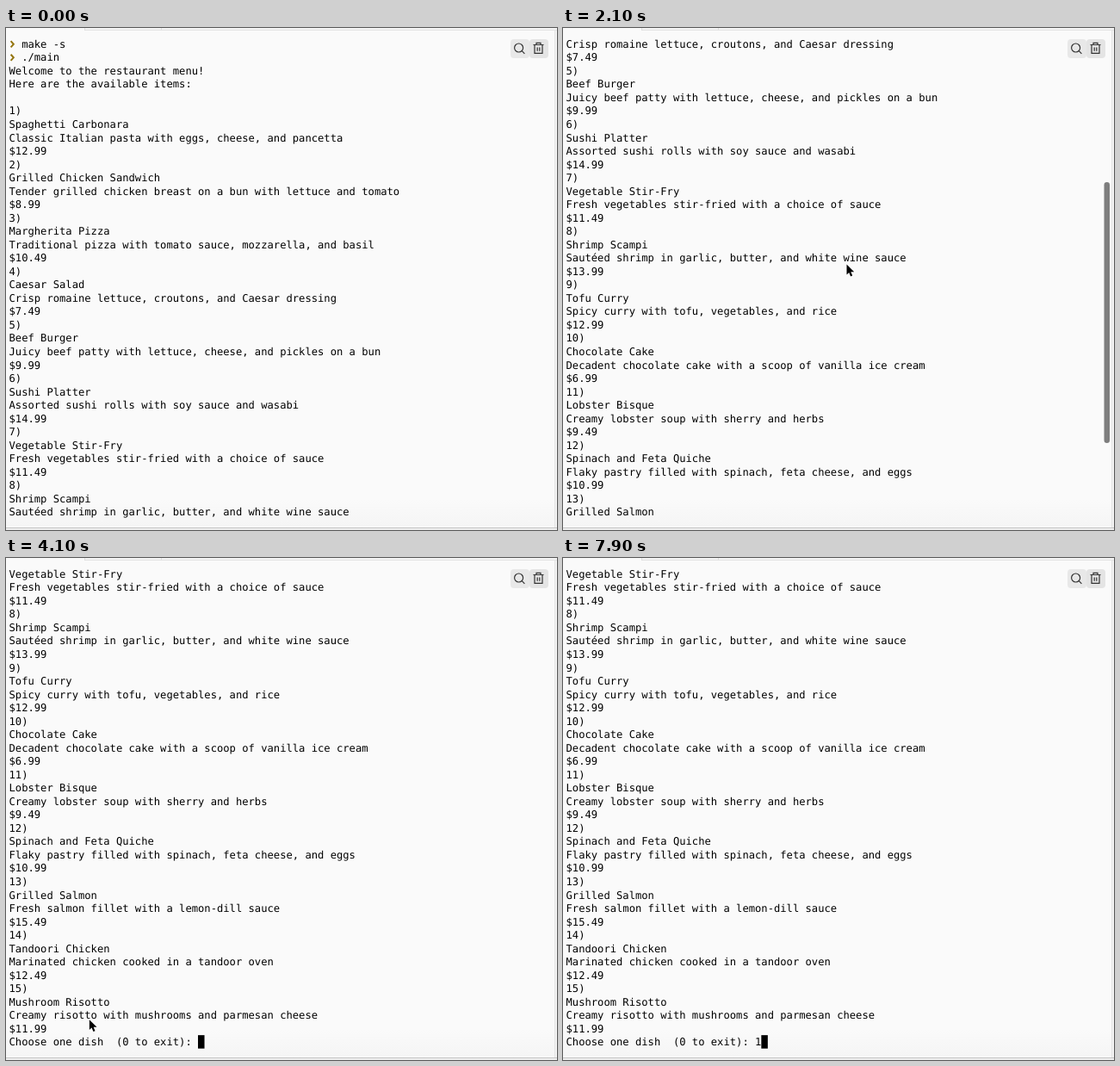
An HTML page with a canvas for the animation above (8000 ms loop, 640 by 583 pixels).

```html
<!DOCTYPE html>
<html lang="en">
<head>
<meta charset="utf-8">
<title>Restaurant menu</title>
<style>
html, body { margin: 0; width: 100%; height: 100%; overflow: hidden; background: #fafafa; }
canvas { display: block; width: 640px; height: 583px; }
</style>
</head>
<body>
<canvas id="stage" width="640" height="583"></canvas>
<script>
const ctx = document.getElementById('stage').getContext('2d');
const W = 640, H = 583, LOOP = 8000, STEP = 100;
const LEFT = 3.5, TOP = 10.8, CELL_W = 7.317, CELL_H = 15.53, ROWS = 36;
const PROMPT_ROWS = 2;

const menu = `Spaghetti Carbonara|Classic Italian pasta with eggs, cheese, and pancetta|12.99
Grilled Chicken Sandwich|Tender grilled chicken breast on a bun with lettuce and tomato|8.99
Margherita Pizza|Traditional pizza with tomato sauce, mozzarella, and basil|10.49
Caesar Salad|Crisp romaine lettuce, croutons, and Caesar dressing|7.49
Beef Burger|Juicy beef patty with lettuce, cheese, and pickles on a bun|9.99
Sushi Platter|Assorted sushi rolls with soy sauce and wasabi|14.99
Vegetable Stir-Fry|Fresh vegetables stir-fried with a choice of sauce|11.49
Shrimp Scampi|Sautéed shrimp in garlic, butter, and white wine sauce|13.99
Tofu Curry|Spicy curry with tofu, vegetables, and rice|12.99
Chocolate Cake|Decadent chocolate cake with a scoop of vanilla ice cream|6.99
Lobster Bisque|Creamy lobster soup with sherry and herbs|9.49
Spinach and Feta Quiche|Flaky pastry filled with spinach, feta cheese, and eggs|10.99
Grilled Salmon|Fresh salmon fillet with a lemon-dill sauce|15.49
Tandoori Chicken|Marinated chicken cooked in a tandoor oven|12.49
Mushroom Risotto|Creamy risotto with mushrooms and parmesan cheese|11.99`;

const lines = ['  make -s', '  ./main', 'Welcome to the restaurant menu!', 'Here are the available items:', ''];
menu.split('\n').forEach((row, i) => {
  const [name, text, price] = row.split('|');
  lines.push(`${i + 1})`, name, text, '$' + price);
});
const question = 'Choose one dish  (0 to exit): ';

// Keys are [time, value, ...]
const scrollKeys = [
  [1200, 0], [1300, 0.7], [1400, 2], [1500, 4.6], [1600, 7.6], [1700, 10.51],
  [1800, 13], [1900, 15.5], [2000, 17.7], [2100, 19.3], [2200, 20.5],
  [2400, 22], [2600, 22], [2700, 24.5], [2800, 28], [2900, 30]
];
const pointerKeys = [
  [400, 102, 281], [500, 205, 279], [600, 298, 276], [700, 329, 274],
  [3400, 329, 274], [3600, 308, 310], [3900, 185, 475], [4200, 52, 566],
  [4400, 32, 564], [4700, 70, 560], [5100, 138, 561], [5200, 139, 563],
  [5400, 139, 563], [5500, 132.5, 547.5], [5800, 75, 480], [6100, 22, 437],
  [6300, 11, 436], [6400, 6, 438], [6600, 50, 442], [6800, 110, 452], [7000, 138, 456]
];

function sample(keys, t) {
  if (t <= keys[0][0]) return keys[0].slice(1);
  for (let i = 1; i < keys.length; i++) {
    const a = keys[i - 1], b = keys[i];
    if (t <= b[0]) {
      const k = (t - a[0]) / (b[0] - a[0]);
      return a.slice(1).map((v, j) => v + (b[j + 1] - v) * k);
    }
  }
  return keys[keys.length - 1].slice(1);
}

function rect(x, y, w, h, color, r = 0) {
  ctx.fillStyle = color;
  ctx.beginPath();
  ctx.roundRect(x, y, w, h, r);
  ctx.fill();
}

function stroke(d, color, width) {
  ctx.strokeStyle = color;
  ctx.lineWidth = width;
  ctx.stroke(new Path2D(d));
}

function drawFrame() {
  rect(0, 0, W, H, '#fafafa');
  const shade = ctx.createLinearGradient(0, 548, 0, 579);
  shade.addColorStop(0, '#fafafa');
  shade.addColorStop(1, '#f5f5f5');
  rect(0, 548, W, 31, shade);
  rect(92, 0, W - 92, 2, '#f5f5f5');
  rect(92, 2, W - 92, 1, '#e3e3e3');
  rect(91, 0, 1, 3, '#e0e0e0');
  rect(180, 0, 1, 2, '#e0e0e0');
  rect(637, 2, 1, 578, '#e4e4e4');
  rect(638, 3, 2, 577, '#f3f3f3');
  rect(0, 580, W, 1, '#c4c4c4');
  rect(0, 581, W, 2, '#eeeeee');
}

function drawButtons() {
  rect(586, 13, 22, 22, '#e8e8e8', 4);
  rect(608, 13, 22, 22, '#e4e4e4', 4);
  stroke('M600.6 23a5 5 0 1 1-10 0a5 5 0 1 1 10 0M599.3 26.6L602.4 29.8', '#333', 1.2);
  stroke('M612.5 19.5H624.5M616 19.2V17.4H621V19.2M614 19.7V29.4H623V19.7M617.2 22.5V26.8M619.8 22.5V26.8', '#333', 1.2);
}

function drawLine(text, row) {
  const y = TOP + row * CELL_H + 12;
  ctx.fillStyle = '#000';
  [...text].forEach((ch, i) => {
    if (ch !== ' ') ctx.fillText(ch, LEFT + i * CELL_W, y);
  });
}

function drawTerminal(scroll, typed) {
  const first = Math.round(scroll);
  const all = [...lines, question + typed];
  ctx.font = '12.154px "DejaVu Sans Mono", monospace';
  ctx.textRendering = 'geometricPrecision';
  for (let row = 0; row < ROWS; row++) {
    const n = first + row;
    if (n >= all.length) break;
    drawLine(all[n], row);
    if (n < PROMPT_ROWS) {
      const y = TOP + row * CELL_H + 8;
      stroke(`M5.6 ${y - 3.6}L8.8 ${y}L5.6 ${y + 3.6}`, '#94750f', 2);
    }
    if (n === all.length - 1) {
      rect(LEFT + all[n].length * CELL_W, TOP + row * CELL_H - 0.2, CELL_W + 0.2, CELL_H, '#000');
    }
  }
}

function drawThumb(scroll, t) {
  if (t < 1300 || t >= 3700) return;
  ctx.globalAlpha = Math.min(1, (3700 - t) / 400);
  rect(628.5, 6 + 8.97 * scroll, 6.5, 303, '#7e7e7e', 3.25);
  ctx.globalAlpha = 1;
}

const arrow = new Path2D('M0.5 0.5V12.4L3.2 9.9L5.1 14.4L7.2 13.5L5.3 9.2H9.2Z');
function drawPointer(t) {
  if (t < 400 || t >= 7700) return;
  const [x, y] = sample(pointerKeys, t);
  ctx.save();
  ctx.translate(x, y);
  ctx.lineJoin = 'round';
  ctx.strokeStyle = '#fff';
  ctx.lineWidth = 1.6;
  ctx.stroke(arrow);
  ctx.fillStyle = '#000';
  ctx.fill(arrow);
  ctx.restore();
}

function draw(now) {
  const t = Math.floor((now % LOOP) / STEP) * STEP;
  const [scroll] = sample(scrollKeys, t);
  drawFrame();
  drawTerminal(scroll, t >= 7900 ? '1' : '');
  drawButtons();
  drawThumb(scroll, t);
  drawPointer(t);
}

const start = performance.now();
function tick() {
  draw(performance.now() - start);
  requestAnimationFrame(tick);
}
tick();
</script>
</body>
</html>
```
